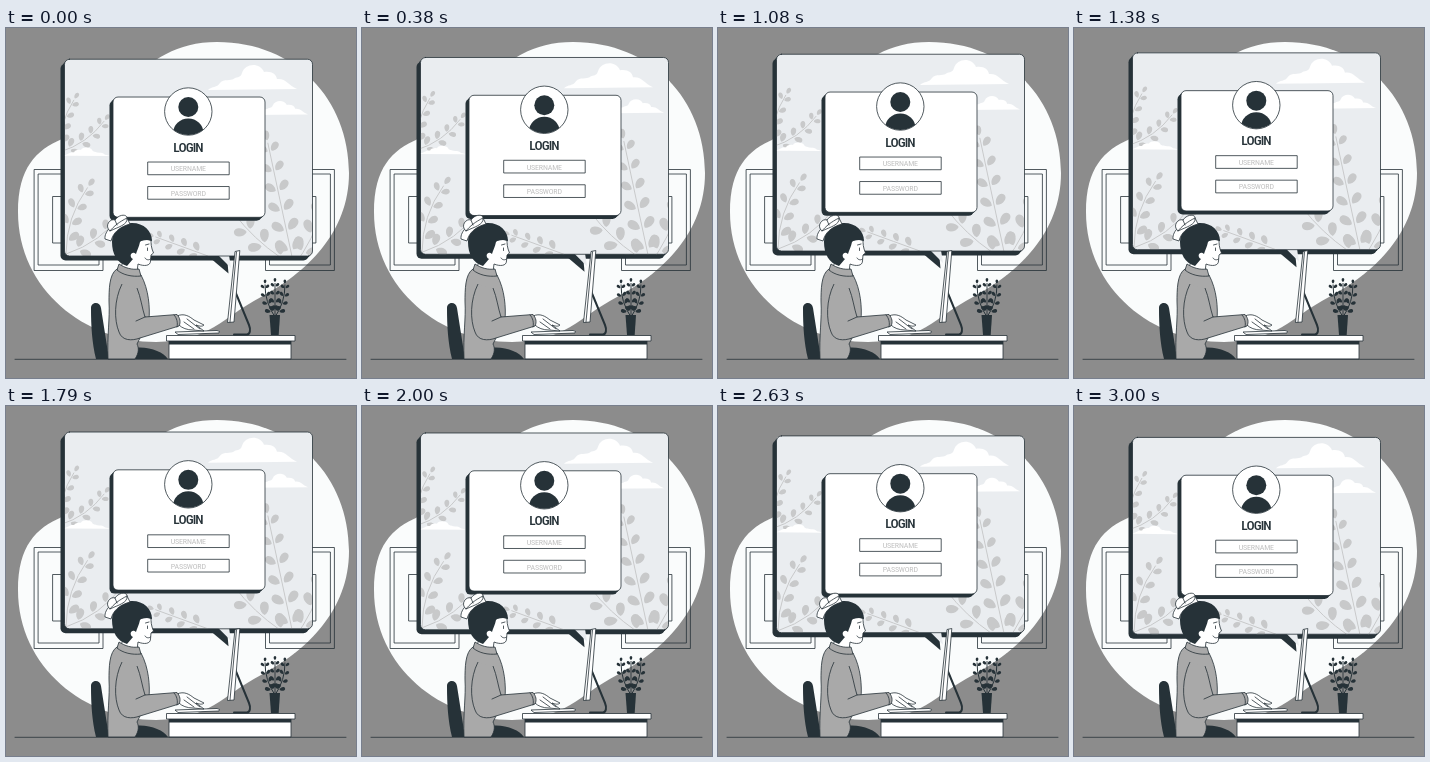
These frames come from a looping animation (350x350 px, 3.04 s). An HTML page:

```html
<!DOCTYPE html>
<html lang="en">
<head>
<meta charset="utf-8">
<title>Login</title>
<style>
  html, body { margin: 0; width: 100%; height: 100%; overflow: hidden; background: #8c8c8c; }
  svg { display: block; width: 100%; height: 100%; }
  .ink { fill: #263238; }
  .glass { fill: #eaedf0; }
  .line { fill: none; stroke: #263238; stroke-width: .8; stroke-linecap: round; stroke-linejoin: round; }
  .paper { fill: #fff; stroke: #263238; stroke-width: .8; stroke-linejoin: round; }
  .wool { fill: #a9a9a9; stroke: #263238; stroke-width: .8; stroke-linejoin: round; }
  text { font-family: "Roboto Condensed", "Open Sans Condensed", Roboto, sans-serif; font-stretch: condensed; text-anchor: middle; }
  .title { font-size: 13.5px; font-weight: 500; letter-spacing: -.9px; fill: #263238; }
  .hint { font-size: 8px; letter-spacing: -.2px; fill: #c0c0c0; }
</style>
</head>
<body>
<svg viewBox="0 0 350 350">
  <defs>
    <rect id="panel" x="58.5" y="31.2" width="248" height="196.8" rx="5"/>
    <rect id="card" x="107" y="69" width="152" height="120.3" rx="5"/>
    <rect id="field" x="141.7" y="134" width="81.5" height="12.7"/>
    <path id="cloud" d="M0 0C4-4 9-2 12-7C16-12 22-8 27-12C32-13 33-14 34-17C37-27 52-28 56-18C64-19 68-16 69-11C78-12 80-5 89-1Z"/>
    <path id="frame" d="M28.5 141.5H97V242.5H28.5ZM32.5 146H93V237H32.5ZM47 168.500H79V215H47Z"/>
    <clipPath id="screen"><use href="#panel"/></clipPath>
    <clipPath id="badge"><circle cx="182.3" cy="83.5" r="23.5"/></clipPath>
  </defs>

  <path fill="#fafcfc" d="M211 14C290 14 343 72 343 145C343 205 300 245 255 269C215 290 205 313 150 314C80 314 12 262 12 184C12 140 30 122 56 111C110 88 130 14 211 14Z"/>
  <use href="#frame" class="line"/>
  <use href="#frame" class="line" transform="translate(356.5) scale(-1 1)"/>

  <g id="bubble">
    <g class="ink">
      <use href="#panel" x="-4" y="4.5"/>
      <use href="#panel" x="-2" y="2.2"/>
      <path d="M203 229L222.5 245.5L221 229Z"/>
    </g>
    <path class="glass" d="M212 227L225 240L223 227Z"/>
    <use href="#panel" class="glass"/>
    <g clip-path="url(#screen)">
      <g id="foliage"></g>
      <g fill="#fff">
        <use href="#cloud" transform="translate(202 62)"/>
        <use href="#cloud" transform="translate(245 87) scale(.64 .56)"/>
        <use href="#cloud" transform="translate(104 128) scale(-.52 .34)"/>
      </g>
    </g>
    <use href="#panel" class="line"/>
    <g class="ink">
      <use href="#card" x="-3.5" y="3.5"/>
      <use href="#card" x="-1.8" y="1.8"/>
    </g>
    <use href="#card" class="paper"/>
    <circle class="paper" cx="182.3" cy="83.5" r="23.7"/>
    <g class="ink" clip-path="url(#badge)">
      <circle cx="182.3" cy="79" r="10"/>
      <ellipse cx="182.3" cy="105" rx="15.2" ry="14.500"/>
    </g>
    <text class="title" x="182" y="123.5">LOGIN</text>
    <use href="#field" class="paper"/>
    <use href="#field" class="paper" y="24.5"/>
    <text class="hint" x="182.3" y="143.3">USERNAME</text>
    <text class="hint" x="182.3" y="167.8">PASSWORD</text>
  </g>

  <!-- chair, trousers, desk -->
  <path class="ink" d="M85 280C85 274 94 273 95 280L103 331H90C86 315 85 298 85 280Z"/>
  <path class="ink" d="M128 320C143 318 157 324 162 331H126Z"/>
  <rect class="paper" x="163" y="312" width="122" height="19"/>
  <rect class="ink" x="163" y="312.5" width="122" height="4"/>
  <rect class="paper" x="160.5" y="307.5" width="128.5" height="5.5"/>
  <path class="line" d="M9 331.3H340"/>

  <!-- monitor and keyboard -->
  <path class="line" style="stroke-width:2" d="M229 263L243 297C245 302 244 306 241 306.500H228"/>
  <path class="paper" d="M229 223.500L233.800 222.500L228 294L221.500 294.500Z"/>
  <path class="line" d="M230.500 224L224 294"/>
  <path class="paper" d="M169 304L211 302.500Q215 303 213 305L172 306.500Z"/>

  <!-- woman -->
  <path class="paper" d="M122 214L145 211C145 216 145 219 147.500 225L145 227L144.500 233C144.500 238 138 238.500 132 236L131 244L115 240Z"/>
  <path class="ink" d="M106 214C106 202 114 195 126 195C138 195 146 203 146 213C141 212 137 211 134 214C133 219 131 222 130 226C126 222 122 228 127 231L121 238C111 235 106 226 106 214Z"/>
  <path class="line" d="M139.500 217L143 216M141.500 220V222.500M139 230C140 232 143 232.500 144.500 231"/>
  <path class="paper" d="M99 211C98 203 108 194 121 190L124 196C113 199 107 205 105 213Z"/>
  <path class="paper" d="M104 203C98 198 104 190 109 192C113 186 121 186 121 190C122 197 112 199 104 203Z"/>
  <path class="line" d="M104 203C108 198 113 194 121 190M109 192L111 197"/>
  <path class="wool" d="M111 241C103 246 103 262 103 274C104 290 101 308 102 331H129C133 325 133 320 131 316L143 292C144 280 143 262 135 247Z"/>
  <path class="wool" d="M113 236C119 240 126 242 133 241L135 248C126 249 117 247 111 242Z"/>
  <path class="paper" d="M171 288C178 285 183 288 188 292L198 297C196 299 193 298 190 297L198 303L187 302C181 302 176 300 173 297Z"/>
  <path class="line" d="M181 291L194 301M178 294L188 301"/>
  <path class="wool" d="M116 256C108 272 108 292 113 304C116 313 126 313 134 310L173 298C175 294 174 290 171 286.500L139 289C136 280 135 270 131 260"/>
  <path class="line" d="M168 287C171 290 172 295 171 299M139 289L130 293"/>

  <g id="potted"></g>
  <path class="ink" d="M263.500 287H274L272.700 307H265Z"/>
</svg>
<script>
  const NS = "http://www.w3.org/2000/svg";
  const byId = id => document.getElementById(id);

  function addPath(parent, attrs) {
    const path = document.createElementNS(NS, "path");
    for (const key in attrs) path.setAttribute(key, attrs[key]);
    parent.append(path);
  }

  // Leaf pairs along a bent stem, with one leaf at its tip; angles in degrees.
  function sprig(parent, color, x, y, angle, length, pairs, bend) {
    const at = u => [length * u, bend * length * 4 * u * (1 - u)];
    const group = document.createElementNS(NS, "g");
    group.setAttribute("transform", `translate(${x} ${y}) rotate(${angle})`);
    group.setAttribute("fill", color);
    parent.append(group);
    addPath(group, {
      d: `M0 0Q${length / 2} ${2 * bend * length} ${length} 0`,
      fill: "none", stroke: color, "stroke-width": .9
    });
    const leaf = (u, turn, s) => {
      const lean = Math.atan(bend * 4 * (1 - 2 * u)) * 180 / Math.PI;
      addPath(group, {
        d: "M0 0H.2C.4-.36 1-.34 1 0S.4.34.2 0",
        transform: `translate(${at(u)}) rotate(${lean + turn}) scale(${s})`
      });
    };
    const size = .85 * length / pairs;
    for (let i = 0; i < pairs; i++) {
      const u = (i + .7) / (pairs + .2), s = size * (1.05 - .35 * u);
      leaf(u, 48, s);
      leaf(u, -48, s);
    }
    leaf(1, 0, size * .7);
  }

  // Sprigs from one root, spread evenly around a direction.
  function fan(parent, color, x, y, angle, step, count, length, pairs) {
    for (let i = 0; i < count; i++) {
      const side = i - (count - 1) / 2;
      sprig(parent, color, x, y, angle + side * step, length, pairs, .08 * Math.sign(side));
    }
  }

  const foliage = byId("foliage"), pale = "#c8c9ca";
  fan(foliage, pale, 54, 124, -55, 40, 2, 54, 4);
  fan(foliage, pale, 60, 226, -54, 36, 2, 70, 4);
  fan(foliage, pale, 202, 228, -160, 0, 1, 56, 4);
  fan(foliage, pale, 288, 238, -102, 30, 3, 126, 6);
  fan(byId("potted"), "#263238", 269, 289, -90, 17, 3, 34, 4);

  const LOOP = 3040, LEAD = 60, RISE = 7, REST = .3;
  const bubble = byId("bubble"), start = performance.now();
  function draw() {
    const p = (performance.now() - start + LEAD) % LOOP / LOOP;
    bubble.setAttribute("transform", `translate(0 ${REST - RISE * (1 - Math.abs(1 - 2 * p))})`);
    requestAnimationFrame(draw);
  }
  draw();
</script>
</body>
</html>
```
